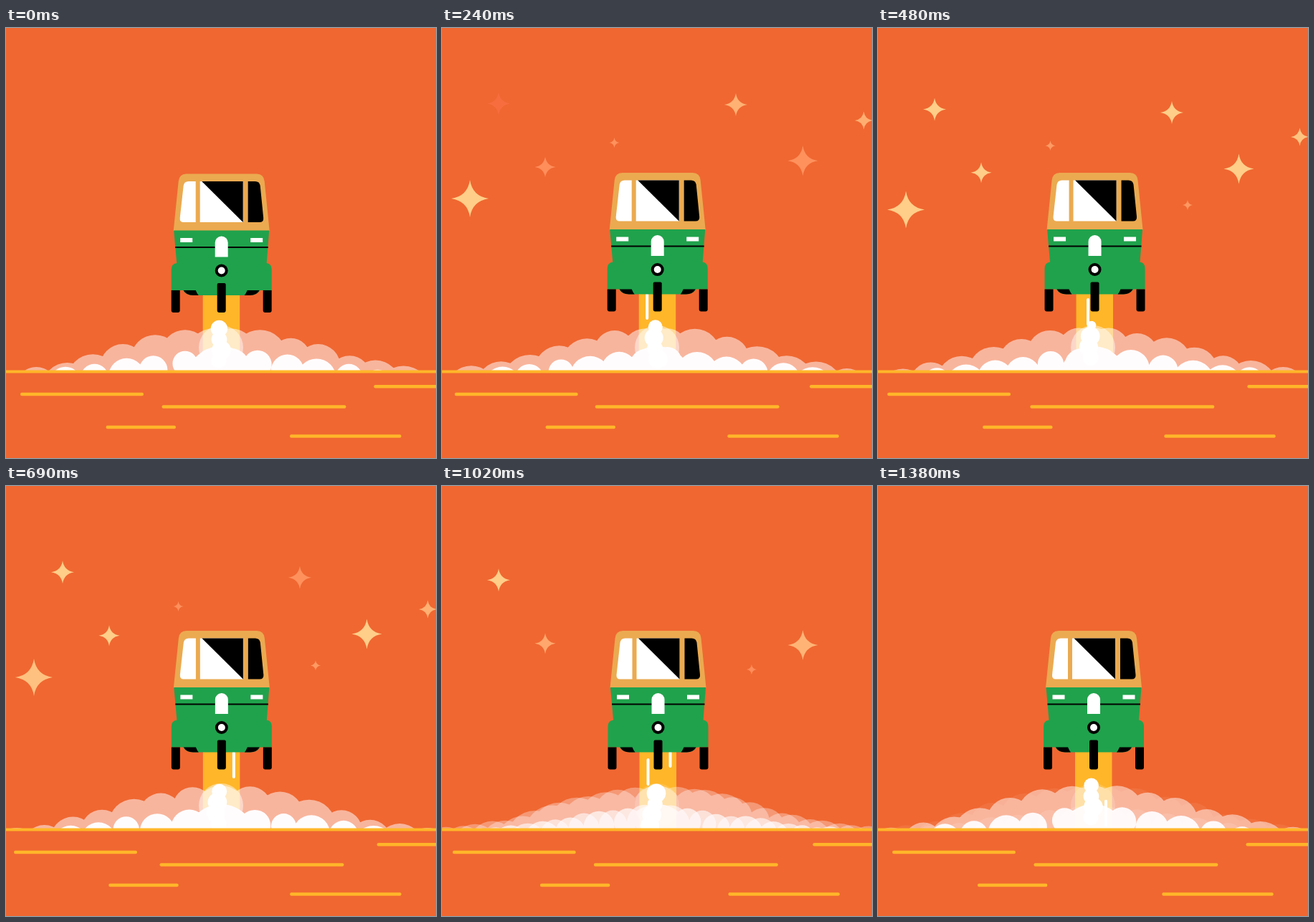
Recreate the animation shown at these times as an HTML page with a canvas. Size 600 by 600 pixels, loop 1410 ms.

```html
<!DOCTYPE html>
<html lang="en">
<head>
<meta charset="utf-8">
<title>Rocket rickshaw</title>
<style>
html, body { margin: 0; height: 100%; overflow: hidden; background: #f06731; }
canvas { display: block; }
</style>
</head>
<body>
<canvas id="stage" width="600" height="600"></canvas>
<script>
const ctx = document.getElementById('stage').getContext('2d');
const LOOP = 1410, STEP = 30, GROUND = 478, MIDDLE = 300;
const ORANGE = '#f06731', YELLOW = '#ffb629', GREEN = '#20a24c', TAN = '#ebaa50';

const clamp = v => Math.max(0, Math.min(1, v));
const rand = n => Math.abs(Math.sin(n * 127.1 + 3) * 43758.5) % 1;
// Cosine swing with a whole number of cycles per loop, highest at the given time
const swing = (t, cycles, size, peak) => size * Math.cos(2 * Math.PI * cycles * (t - peak) / LOOP);
// Rises from a to b, falls from c to d
const fade = (t, a, b, c, d) => clamp((t - a) / (b - a)) * clamp((d - t) / (d - c));

function shape(color, d) {
  ctx.fillStyle = color;
  ctx.fill(new Path2D(d));
}
function box(color, x, y, w, h, r = 0) {
  ctx.fillStyle = color;
  ctx.beginPath();
  ctx.roundRect(x, y, w, h, r);
  ctx.fill();
}
function disc(color, x, y, r) {
  ctx.fillStyle = color;
  ctx.beginPath();
  ctx.arc(x, y, r, 0, 2 * Math.PI);
  ctx.fill();
}

const stars = [
  { x: 39, y: 222.5, speed: .0645, r: 26, from: 50, to: 900 },
  { x: 79, y: 97.6, speed: .033, r: 16, from: 215, to: 1350 },
  { x: 144, y: 186, speed: .033, r: 14.5, from: 170, to: 1170 },
  { x: 410, y: 96, speed: .046, r: 16, from: 110, to: 790 },
  { x: 588.5, y: 106, speed: .0957, r: 12.5, from: 100, to: 880 },
  { x: 503.5, y: 174, speed: .047, r: 21, from: 165, to: 1200 },
  { x: 240.5, y: 155.7, speed: .0178, r: 7, from: 90, to: 880 },
  { x: 432, y: 239, speed: .0167, r: 7, from: 310, to: 1200 }
];
function drawStars(t) {
  for (const { x, y, speed, r, from, to } of stars) {
    const glow = Math.min(1, r / 14) * fade(t, from, from + 180, to - 240, to);
    const c = r * .13;
    ctx.save();
    ctx.translate(x, y + speed * t);
    ctx.globalAlpha = Math.min(1, glow * 4);
    shape(`rgb(255,${102 + 104 * glow},${62 + 74 * glow})`,
      `M0 ${-r}Q${c} ${-c} ${r} 0Q${c} ${c} 0 ${r}Q${-c} ${c} ${-r} 0Q${-c} ${-c} 0 ${-r}Z`);
    ctx.restore();
  }
}

// Bumps stream outwards from the middle, sinking along the slope of the cloud
const pink = { births: 24, core: 36, radius: 27, vary: 12, reach: 7,
  top: d => 447 - 29 * Math.cos(Math.PI * d / 300) };
const white = { births: 12, core: 48, radius: 17, vary: 12, reach: 6,
  top: d => 444 + .14 * d };

function cloud({ births, core, radius, vary, reach, top }, t, alpha) {
  if (alpha <= 0) return;
  const turns = t * births / LOOP;
  const bump = (x, y, r) => {
    ctx.moveTo(x + r, y + r);
    ctx.arc(x, y + r, r, 0, 2 * Math.PI);
  };
  ctx.beginPath();
  bump(MIDDLE, top(0), core);
  for (const side of [-1, 1]) {
    for (let i = 0; i < reach; i++) {
      const id = (Math.floor(turns) - i + births) % births + (side + 1) * 50;
      const d = 12 + 41 * (i + turns % 1) + 8 * (rand(id) - .5);
      const y = top(d) + 5 * (rand(id + 200) - .5);
      bump(MIDDLE + side * d, y, radius + vary * rand(id + 400));
    }
  }
  ctx.fillStyle = `rgba(255,252,253,${alpha})`;
  ctx.fill();
}

// Puffs swell at the top of the cloud and tumble down, drifting sideways
function drawPuffs(t) {
  const births = 5, turns = t * births / LOOP + .3;
  for (let i = 0; i < 4; i++) {
    const age = i + turns % 1;
    const id = (Math.floor(turns) - i + births) % births;
    const r = (10 + 6 * rand(id + 7)) * Math.min(1, .6 + age);
    disc('#fff', 298 + 5 * age * (rand(id) - .6), 415 + 15 * age, r);
  }
}

// Start time and distance from the middle of the beam
const streaks = [[75, -14.5], [280, -9.5], [520, 17], [807, -14], [916, 17]];
function drawStreaks(t, x) {
  for (const [start, dx] of streaks) {
    const y = 331 + .23 * (t - start);
    if (y > 331 && y < 442) box('#fff', x + dx - 2, y, 4, 38, 2);
  }
}

function drawExhaust(t, x) {
  const ghost = fade(t, 800, 1000, 1250, LOOP);
  const haze = .45 - .3 * clamp((t - 700) / 200);
  ctx.save();
  ctx.beginPath();
  ctx.rect(0, 0, 600, GROUND);
  ctx.clip();
  box(YELLOW, x - 26, 360, 51.5, 120);
  cloud(pink, t, .53 - .2 * ghost);
  cloud(pink, (t + 35) % LOOP, .33 * ghost);
  disc(`rgba(255,255,255,${haze})`, MIDDLE, 446, 31);
  cloud(white, t, 1 - .3 * ghost);
  cloud(white, (t + 60) % LOOP, .6 * ghost);
  drawPuffs(t);
  drawStreaks(t, x);
  ctx.restore();
}

function drawRickshaw(x, y) {
  ctx.save();
  ctx.translate(x - MIDDLE, y - 338.5);
  // Cab
  shape(TAN, 'M233 283L240 214Q241 203.5 251 203.5H349Q359 203.5 360 214L367 283Z');
  shape('#fff', 'M254 214H264V271H247Q241.5 271 242 265L247 220Q248 214 254 214Z');
  shape('#000', 'M337 214H347Q353 214 354 220L358.5 265Q359 271 353 271H337Z');
  box('#fff', 270, 214, 60, 57);
  shape('#000', 'M272.5 214H330V271Z');
  // Body
  shape(GREEN, 'M233.5 282.5H366.5L363 328Q370 329 370 337V366H354Q349 373 340 373H260Q251 373 246 366H230V337Q230 329 237.5 328Z');
  for (const side of [1, -1]) {
    ctx.save();
    ctx.translate(MIDDLE, 0);
    ctx.scale(side, 1);
    shape('#000', 'M-53 366H-36Q-34 371 -32 373H-40Q-49 373 -53 366Z');
    box('#fff', -57.5, 293, 17, 6);
    box('#000', -70, 366, 12, 31, [0, 0, 3, 3]);
    ctx.restore();
  }
  box('#000', 235.5, 305, 129.5, 2);
  box('#fff', 291, 290.5, 18, 29, [9, 9, 0, 0]);
  disc('#000', MIDDLE, 338.5, 9);
  disc('#fff', MIDDLE, 338.5, 5);
  box('#000', 294, 356, 12, 41, [2, 2, 3, 3]);
  ctx.restore();
}

function drawGround(t) {
  const line = (x, y, length) => box(YELLOW, x, y - 2.2, length, 4.4, 2.2);
  box(YELLOW, 0, 477.5, 600, 4);
  line(515.5 + swing(t, 1, 2.7, 842), 500.3, 120);
  line(15.5 + swing(t, 1, 4.5, 0), 511, 172);
  line(214 + swing(t, 1, 1.5, 0) + swing(t, 2, 2, 0), 528.5, 257);
  line(141.2 + swing(t, 1, 5, 431), 557, 97.5);
  line(397.9 + swing(t, 2, 2, 392), 569.5, 155.5);
}

function draw(now) {
  const t = Math.floor(now % LOOP / STEP) * STEP;
  const x = 301.3 + swing(t, 2, 1.25, 472);
  const y = 337 + 1.5 * Math.exp(-t / 60);
  box(ORANGE, 0, 0, 600, 600);
  drawStars(t);
  drawExhaust(t, x);
  drawRickshaw(x, y);
  drawGround(t);
}

const start = performance.now();
function tick() {
  draw(performance.now() - start);
  requestAnimationFrame(tick);
}
tick();
</script>
</body>
</html>
```
